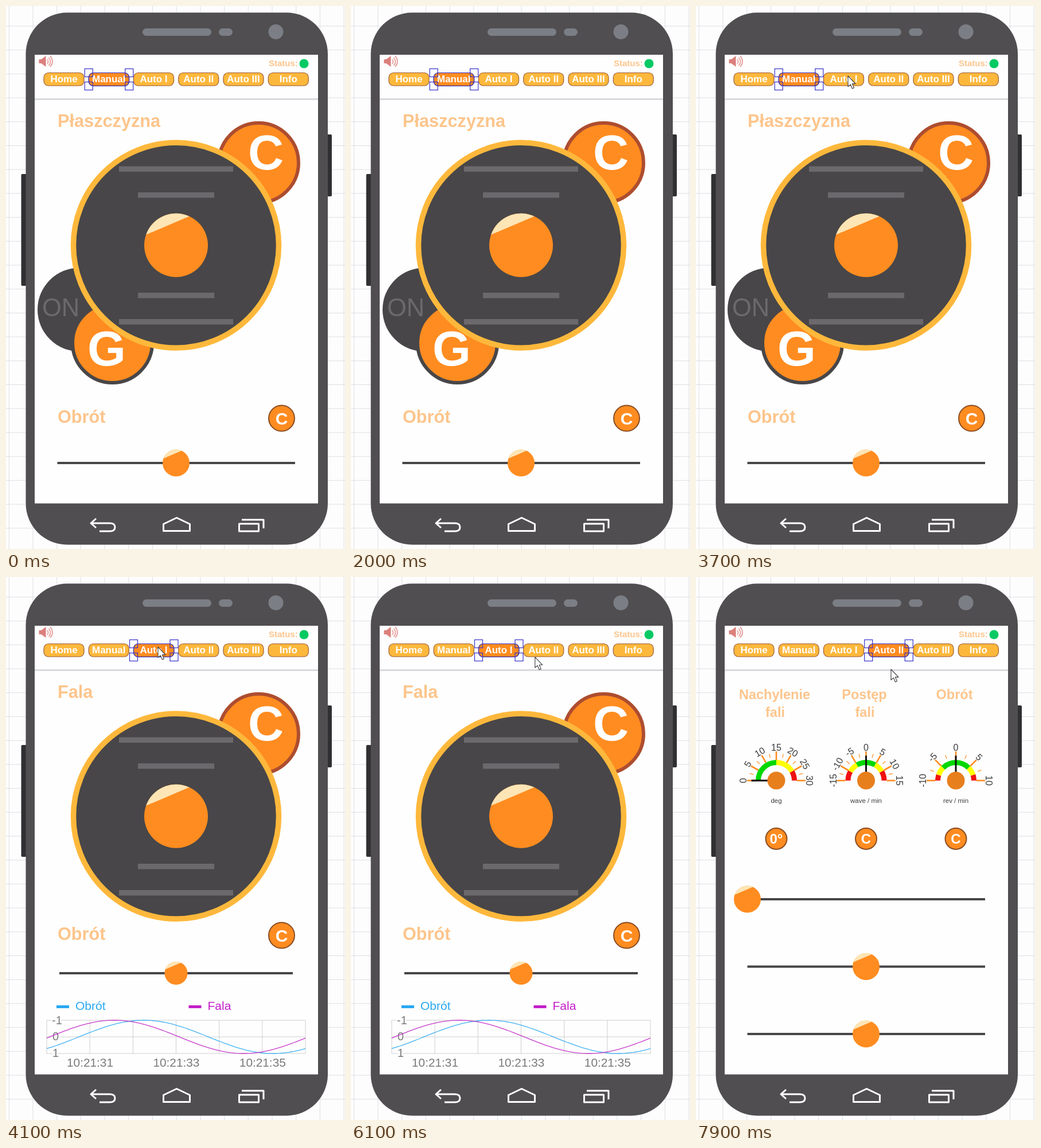
Write an HTML page that moves like this. It is 591 px wide and 947 px high and loops after 8000 ms.

```html
<!DOCTYPE html>
<html lang="pl">
<head>
<meta charset="utf-8">
<title>Panel</title>
<style>
html, body { margin: 0; width: 100%; height: 100%; overflow: hidden; background: #fdfdfe; }
svg { display: block; width: 100%; height: 100%; }
text { font-family: "Liberation Sans", Arial, sans-serif; }
</style>
</head>
<body>
<svg id="stage" viewBox="0 0 591 947"></svg>
<script>
const ORANGE = '#ff8c20', AMBER = '#fdb83c', DARK = '#484648', PEACH = '#fdc58c', BODY = '#504e50';
const LOOP = 8000, STEP = 100;

const range = (n, f) => Array.from({ length: n }, (_, i) => f(i)).join('');
const rect = (x, y, w, h, fill, extra = '') =>
  `<rect x="${x}" y="${y}" width="${w}" height="${h}" fill="${fill}" ${extra}/>`;
const circle = (x, y, r, fill, extra = '') => `<circle cx="${x}" cy="${y}" r="${r}" fill="${fill}" ${extra}/>`;
const line = (x1, y1, x2, y2, color, w = 1) =>
  `<path d="M${x1} ${y1}L${x2} ${y2}" stroke="${color}" stroke-width="${w}" fill="none"/>`;
const text = (s, x, y, size, fill, extra = '') =>
  `<text x="${x}" y="${y}" font-size="${size}" fill="${fill}" ${extra}>${s}</text>`;
const BOLD = 'font-weight="700"', MID = 'text-anchor="middle"', BOLD_MID = BOLD + ' ' + MID;

const ball = (x, y, r) => circle(x, y, r, ORANGE) +
  `<path transform="translate(${x} ${y}) scale(${r})" d="M-.943-.333A1 1 0 0 1 .415-.91Z" fill="#fee5b5"/>`;
const slider = (x1, x2, y, at, r) => line(x1, y, x2, y, DARK, 4) + ball(at, y, r);
const heading = (s, y) => text(s, 90, y, 30.7, PEACH, BOLD);
const roundButton = (s, x, y, r, size) =>
  circle(x, y, r, ORANGE, 'stroke="#8a4c22" stroke-width="2"') +
  text(s, x, y + size * .36, size, '#fff', BOLD_MID);

function backdrop() {
  const pitch = 41.7;
  return rect(0, 0, 591, 947, '#fdfdfe') +
    range(15, i => line(5.3 + i * pitch, 0, 5.3 + i * pitch, 947, '#dedfe3')) +
    range(23, i => line(0, 35 + i * pitch, 591, 35 + i * pitch, '#dedfe3'));
}

function phone() {
  const speaker = '#7b7e85';
  return rect(26.5, 293, 12, 195, '#302f31', 'rx="2"') +
    rect(556, 224, 12, 108, '#302f31', 'rx="2"') +
    rect(34.5, 11.5, 526.5, 928, BODY, 'rx="72"') +
    rect(238, 39, 120, 13, speaker, 'rx="6.5"') +
    rect(371, 39, 24, 13, speaker, 'rx="6.5"') +
    circle(470.5, 45, 13, speaker) +
    rect(50, 85, 494, 782.5, '#fefefe') +
    `<g fill="none" stroke="#fff" stroke-width="3" stroke-linejoin="round">
      <path d="M157 894l-9 8 9 8M148 902h33q9 0 9 7t-9 7h-18"/>
      <path d="M274.5 915.5v-12l23-11 23 11v12z"/>
      <path d="M406.500 903h34v13h-34zM411 896h38v15"/>
    </g>`;
}

const tabX = i => 66 + i * 78.25;

function header() {
  return `<path d="M57.500 93h4l8-6v19l-8-6h-4z" fill="#dc7f7c"/>
    <path d="M72 93q3 4 0 8M74.500 90q6 7 0 14M77 87q8 10 0 19" fill="none" stroke="#e59a97" stroke-width="1.700"/>` +
    text('Status:', 458, 105, 15, PEACH, BOLD) +
    circle(519.5, 100.5, 8, '#05c963') +
    line(50, 162.500, 544, 162.500, '#d9d9dd', 3);
}

function tabs(active) {
  const names = ['Home', 'Manual', 'Auto I', 'Auto II', 'Auto III', 'Info'];
  const x = tabX(active);
  const tab = (s, i) => rect(tabX(i), 116.5, 70, 22.5, i === active ? ORANGE : AMBER,
    'rx="8" stroke="#9c5a35" stroke-width="1.200"') +
    text(s, tabX(i) + 35, 133, 17, '#fff', BOLD_MID);
  const handle = (hx, hy) => rect(hx - 7, hy - 7, 14, 14, 'none');
  return names.map(tab).join('') +
    `<g stroke="#3531c8" stroke-width="1.200">` +
    rect(x, 116.5, 70.5, 23, 'none', 'rx="8"') +
    handle(x, 116.5) + handle(x + 70.5, 116.5) + handle(x, 139.5) + handle(x + 70.5, 139.5) + '</g>';
}

function dial() {
  const bar = (half, y) => rect(296.5 - half, y, half * 2, 9.5, '#6b696c');
  return circle(440.5, 273.5, 69.5, ORANGE, 'stroke="#ad4d30" stroke-width="6"') +
    text('C', 453, 285, 86, '#fff', BOLD_MID) +
    circle(296.5, 417.3, 179, DARK, `stroke="${AMBER}" stroke-width="9.500"`) +
    bar(99.5, 279.5) + bar(66.5, 325) + bar(66.5, 500) + bar(99.5, 546) +
    ball(296.5, 417.3, 55.5);
}

function manualPage() {
  return heading('Płaszczyzna', 211) +
    circle(128, 529.5, 73, DARK) + text('ON', 63, 541, 43.5, '#6b696c') +
    circle(185.5, 587.5, 69.5, ORANGE, `stroke="${DARK}" stroke-width="6"`) +
    text('G', 175.5, 626.5, 86, '#fff', BOLD_MID) +
    dial() + heading('Obrót', 727) +
    roundButton('C', 480.5, 719, 22.5, 30) +
    slider(89.5, 504, 797, 296.5, 23.5);
}

function chart() {
  const left = 71, width = 451, mid = 802, amp = 29, grey = '#7a7a7a';
  const wave = (peak, color) => {
    const pts = range(91, i => {
      const x = left + i * width / 90;
      return `${x.toFixed(1)},${(mid - amp * Math.cos((x - peak) / width * 2 * Math.PI)).toFixed(2)} `;
    });
    return `<polyline points="${pts}" fill="none" stroke="${color}" stroke-width="1.300"/>`;
  };
  const legend = (s, x, color) => rect(x, 747, 22, 5, color) + text(s, x + 33, 755, 21, color);
  const halo = 'stroke="#fefefe" stroke-width="5" paint-order="stroke"';
  return legend('Obrót', 88, '#2aa8f2') + legend('Fala', 318.5, '#c31fc8') +
    range(7, i => line(left + i * width / 6, mid - amp, left + i * width / 6, mid + amp, '#cfcfcf')) +
    range(3, i => line(left, mid + (i - 1) * amp, left + width, mid + (i - 1) * amp, '#cfcfcf')) +
    text('-1', 80, 780, 20, grey, halo) + text('0', 81, 808, 20, grey, halo) + text('1', 81, 837, 20, grey, halo) +
    range(3, i => text('10:21:3' + (1 + 2 * i), 146.500 + i * 150.4, 854, 20.8, grey, MID)) +
    wave(240, '#3fb1f3') + wave(189, '#c53acb');
}

function wavePage() {
  return heading('Fala', 211) + dial() + heading('Obrót', 633) +
    roundButton('C', 480.5, 625, 22.5, 30) +
    slider(93, 500, 691, 296.5, 20) + chart();
}

function gauge(cx, min, max, value, zones, unit) {
  const cy = 355;
  const turn = v => (v - min) / (max - min) * 180 - 90;
  const spot = (v, r) => {
    const a = turn(v) * Math.PI / 180;
    return `${(cx + r * Math.sin(a)).toFixed(2)} ${(cy - r * Math.cos(a)).toFixed(2)}`;
  };
  const spoke = (v, r1, r2, color, w) =>
    `<path d="M${spot(v, r1)}L${spot(v, r2)}" stroke="${color}" stroke-width="${w}"/>`;
  const arcs = zones.map(([from, to, color]) =>
    `<path d="M${spot(from, 31.5)}A31.500 31.500 0 0 1 ${spot(to, 31.5)}" fill="none" stroke="${color}" stroke-width="9"/>`);
  const majors = (max - min) / 5;
  return arcs.join('') +
    range(majors, i => spoke(min + 2.5 + i * 5, 41, 48, ORANGE, 1.2)) +
    range(majors + 1, i => {
      const v = min + i * 5;
      return spoke(v, 36, 51, ORANGE, 2.6) +
        text(v, cx, cy - 52, 16, '#3c3c3c', `${MID} transform="rotate(${turn(v)} ${cx} ${cy})"`);
    }) +
    spoke(value, 0, 43.5, '#111', 3) + circle(cx, cy, 15.5, '#e87f1d') +
    text(unit, cx, 394, 11.5, '#3c3c3c', MID);
}

function gaugePage() {
  const red = '#f01010', yellow = '#ffff00', green = '#00d800';
  const title = (s, x, y) => text(s, x, y, 23.5, PEACH, BOLD_MID);
  const mirrored = (a, b, c) => [[-a, -b, red], [-b, -c, yellow], [-c, c, green], [c, b, yellow], [b, a, red]];
  return title('Nachylenie', 137, 213) + title('fali', 138, 244) +
    title('Postęp', 293.5, 213) + title('fali', 294.5, 244) + title('Obrót', 450.5, 213) +
    gauge(140, 0, 30, 0, [[0, 15, green], [15, 25, yellow], [25, 30, red]], 'deg') +
    gauge(296.5, -15, 15, 0, mirrored(15, 10, 5), 'wave / min') +
    gauge(453, -10, 10, 0, mirrored(10, 8, 5), 'rev / min') +
    roundButton('0°', 140, 456.5, 18.5, 24) +
    roundButton('C', 296.5, 456.5, 18.5, 24) +
    roundButton('C', 453, 456.5, 18.5, 24) +
    slider(89.5, 504, 562, 89.5, 23.5) +
    slider(89.5, 504, 679.5, 296.5, 23.5) +
    slider(89.5, 504, 797, 296.5, 23.5);
}

const group = (id, content) => `<g id="${id}">${content}</g>`;
document.getElementById('stage').innerHTML = backdrop() + phone() + header() +
  group('page1', manualPage() + tabs(1)) +
  group('page2', wavePage() + tabs(2)) +
  group('page3', gaugePage() + tabs(3)) +
  group('cursor', `<path d="M0 0V18.500L4.300 14.800L7.400 22L10.400 20.700L7.400 13.600H13Z"
    fill="#fff" stroke="#3a3a3f" stroke-width="1.100" stroke-linejoin="round"/>`);

const pages = [1, 2, 3].map(i => document.getElementById('page' + i));
const cursor = document.getElementById('cursor');

// Pointer moves: start, end, from x, from y, to x, to y
const moves = [
  [2200, 2700, 562, 330, 306, 192],
  [3000, 3600, 306, 192, 265, 122],
  [4200, 4700, 265, 122, 306, 176],
  [5700, 6300, 306, 176, 326, 127],
  [7500, 7900, 326, 127, 340, 161]
];
const ease = p => p * p * (3 - 2 * p);

function draw(ms) {
  const t = Math.floor(ms % LOOP / STEP) * STEP;
  const page = t < 4000 ? 0 : t < 7500 ? 1 : 2;
  pages.forEach((p, i) => p.setAttribute('display', i === page ? 'inline' : 'none'));

  const move = moves.filter(m => t >= m[0]).pop();
  cursor.setAttribute('display', move ? 'inline' : 'none');
  if (!move) return;
  const [start, end, x1, y1, x2, y2] = move;
  const p = ease(Math.min(1, (t - start) / (end - start)));
  cursor.setAttribute('transform', `translate(${x1 + (x2 - x1) * p} ${y1 + (y2 - y1) * p})`);
}

const origin = performance.now();
function tick() {
  draw(performance.now() - origin);
  requestAnimationFrame(tick);
}
tick();
</script>
</body>
</html>
```
